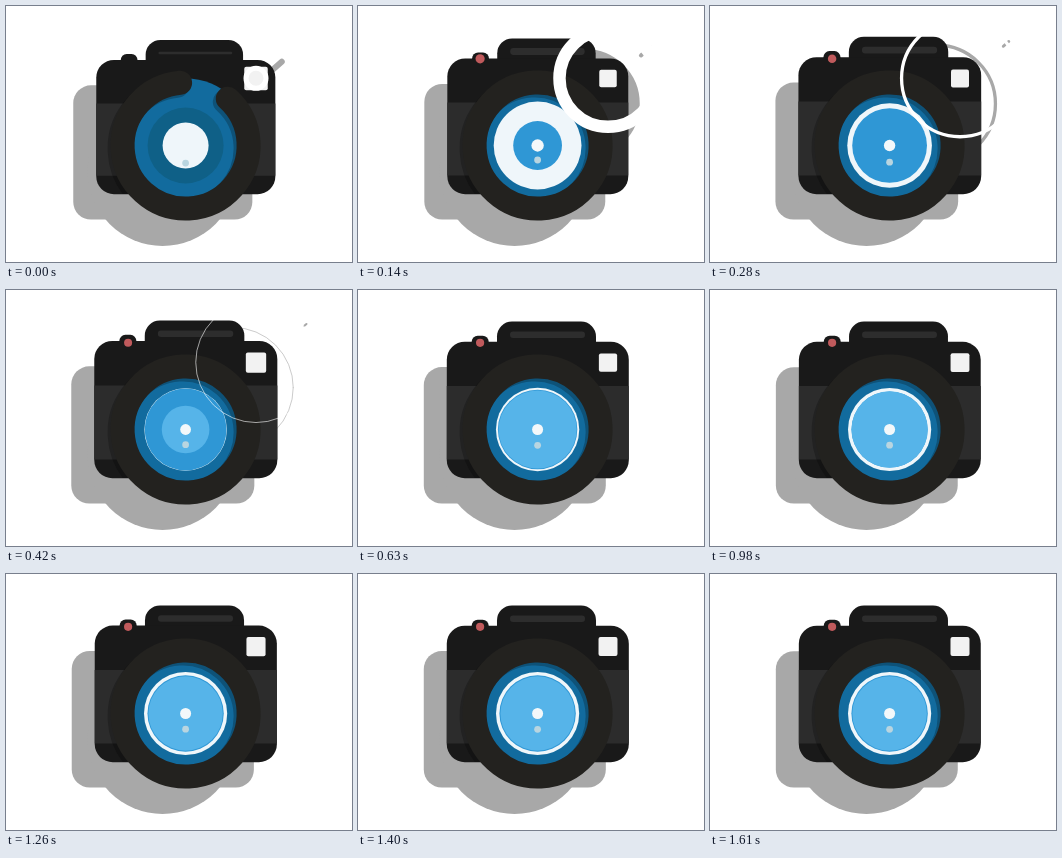
Animation of 346 by 256 pixels, one loop 1680 ms. Source, as an HTML page with a canvas:

```html
<!DOCTYPE html>
<html lang="en">
<head>
<meta charset="utf-8">
<title>Camera flash</title>
<style>
  html, body { margin: 0; width: 100%; height: 100%; overflow: hidden; background: #fff; }
  canvas { display: block; }
</style>
</head>
<body>
<canvas id="stage" width="346" height="256"></canvas>
<script>
const ctx = document.getElementById('stage').getContext('2d');
const LOOP = 1680, STEP = 70, BURST = 7;
const LENS = [179.6, 139.5], FLASH = [250, 72.3];
const GREY = '#a8a8a8', BODY = '#191919';

const easeOut = (p, power) => 1 - (1 - Math.min(p, 1)) ** power;
const mix = (a, b, p) => a + (b - a) * p;

// Damped swing from one value to another; n counts steps.
function spring(n, from, to, decay, speed) {
  return to + (from - to) * Math.exp(-n / decay) * Math.cos(speed * n);
}
const pop = (n, from, to) => spring(n, from, to, 1.5, 1.03);
const swell = (n, to) => n > 0 ? spring(n, 0, to, 2.8, .37) : 0;

function disc(x, y, r, color) {
  if (r <= 0) return;
  ctx.fillStyle = color;
  ctx.beginPath();
  ctx.arc(x, y, r, 0, 7);
  ctx.fill();
}

function box(x, y, w, h, r, color) {
  ctx.fillStyle = color;
  ctx.beginPath();
  ctx.roundRect(x, y, w, h, r);
  ctx.fill();
}

function ring(x, y, r, width, color, from = 0, to = Math.PI * 2) {
  ctx.strokeStyle = color;
  ctx.lineWidth = width;
  ctx.lineCap = 'round';
  ctx.beginPath();
  ctx.arc(x, y, r, from, to);
  ctx.stroke();
}

// The body grows from the middle of its base.
function scaled(n, paint) {
  const s = spring(n, .984, 1, 6, Math.PI / 6);
  ctx.save();
  ctx.translate(179.8, 188);
  ctx.scale(s, s);
  ctx.translate(-179.8, -188);
  paint();
  ctx.restore();
}

function shell(n, color) {
  scaled(n, () => {
    box(139, 31.5, 99, 40, 15, color);
    box(113.7, 45.7, 17, 16, 6, color);
    box(88.8, 51.7, 182, 136.5, 18, color);
  });
}

function wave(n, color) {
  if (n >= BURST) return;
  const p = n / BURST;
  const outer = mix(12.5, 60.3, easeOut(p, 6.4));
  const inner = mix(7.5, 60.3, easeOut(p, 3.2));
  ring(...FLASH, (outer + inner) / 2, Math.max(outer - inner, .6), color);
}

function spark(n) {
  if (n >= BURST) return;
  const p = n / BURST;
  const point = d => [251 + .75 * d, 77.5 - .66 * d];
  ctx.strokeStyle = GREY;
  ctx.lineWidth = mix(6, 2, easeOut(p, 2));
  ctx.lineCap = 'round';
  ctx.beginPath();
  ctx.moveTo(...point(mix(22, 64, easeOut(p, 2))));
  ctx.lineTo(...point(mix(33, 66, easeOut(p, 3.2))));
  ctx.stroke();
}

function shadow(n) {
  ctx.save();
  ctx.translate(-23, 25.4);
  shell(n, GREY);
  disc(...LENS, 75, GREY);
  wave(n, GREY);
  ctx.restore();
  spark(n);
}

function body(n) {
  shell(n, BODY);
  scaled(n, () => {
    const bar = pop(n, 2.5, 6.5);
    box(152, 44.7 - bar / 2, 75, bar, bar / 2, '#2d2d2d');
    box(88.8, 96, 182, 73.5, 0, '#2c2c2c');
  });
  disc(122.1, 52.8, pop(n, 0, 4.1), '#c05a5c');
  const lamp = spring(n, 23.5, 19, 5, Math.PI / 3);
  box(FLASH[0] - lamp / 2, FLASH[1] + .3 - lamp / 2, lamp, lamp, 2, '#f2f2f2');
}

function lens(n) {
  const [x, y] = LENS, rad = Math.PI / 180;
  const gap = mix(47, 0, easeOut(n / 2, 2));
  const from = -48 * rad, to = (312 - gap) * rad;
  disc(x, y, 67, '#126b9e');
  disc(x, y, mix(38, 41, easeOut(n / 2, 2)), '#0f6087');

  // Soft step cast by the barrel, kept inside the body.
  ctx.save();
  ctx.beginPath();
  ctx.rect(89, 52, 182, 136);
  ctx.clip();
  ring(x - 3, y + 3, 63, 24, 'rgba(0,0,0,.24)', from, to);
  ctx.restore();
  ring(x, y, 63, 24, '#23221f', from, to);

  disc(x, y, pop(n, 23, 41.6), '#eff6fa');
  disc(x, y, swell(n, 38.2), '#2f97d5');
  disc(x, y, swell(n - 4, 37.3), '#56b4e9');
  disc(x, y, pop(n, 0, 5.5), '#f3f8fa');
  disc(x, spring(n, 157.1, 155.3, 6, Math.PI / 2), 3.4, '#b9d5e0');
}

function draw(n) {
  ctx.fillStyle = '#fff';
  ctx.fillRect(0, 0, 346, 256);
  shadow(n);
  body(n);
  lens(n);
  wave(n, '#fff');
}

const start = performance.now();
function tick() {
  const time = (performance.now() - start) % LOOP;
  draw(Math.floor(time / STEP));
  requestAnimationFrame(tick);
}
tick();
</script>
</body>
</html>
```
